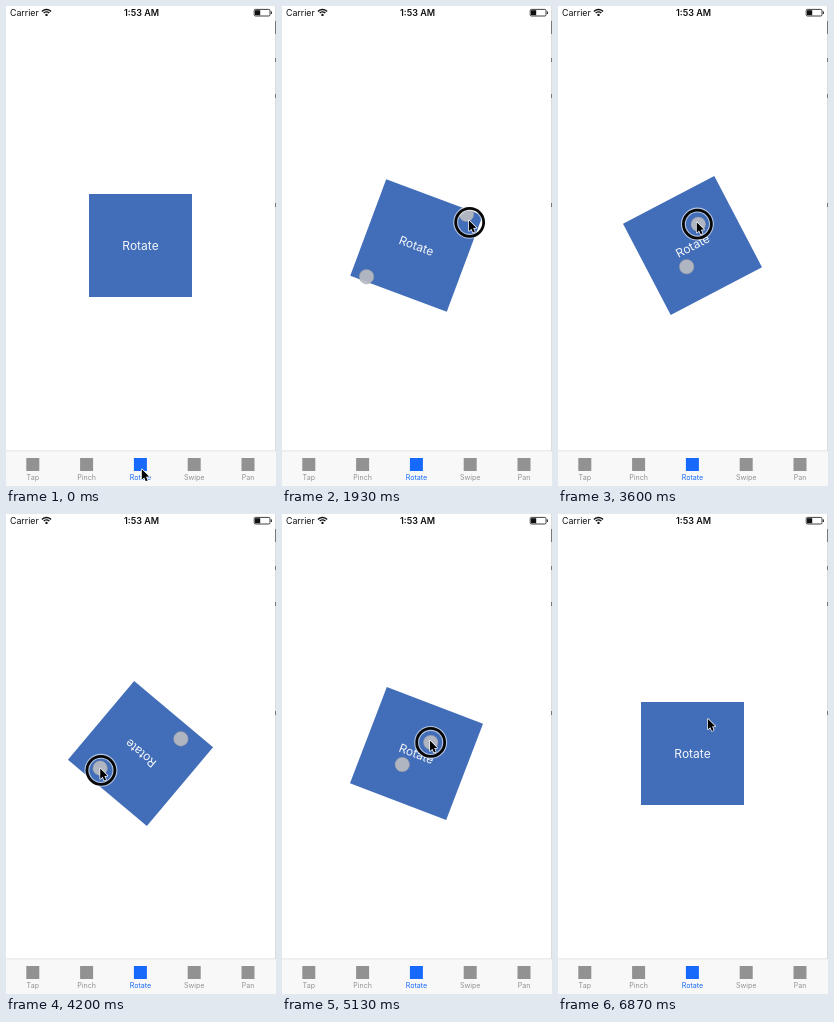
Write an HTML page with a canvas that moves like this. It is 270 px wide and 480 px high and loops after 7.07 s.

```html
<!DOCTYPE html>
<html lang="en">
<head>
<meta charset="utf-8">
<title>Rotate gesture</title>
<style>
  html, body { margin: 0; width: 100%; height: 100%; overflow: hidden; background: #fff; }
  canvas { display: block; width: 270px; height: 480px; }
</style>
</head>
<body>
<canvas id="stage"></canvas>
<script>
const W = 270, H = 480, LOOP = 7070, STEP = 1000 / 15;
const CENTER = { x: 134.5, y: 239.5 }, SIDE = 103;
const PRESS = 1000, RELEASE = 6870, DOTS_ON = 530, TOUCH_LAG = 14;
const FONT = 'Inter, "Liberation Sans", sans-serif';
const BLUE = '#1769fb', GRAY = '#929292';

const canvas = document.getElementById('stage');
const ctx = canvas.getContext('2d');
const scale = window.devicePixelRatio || 1;
canvas.width = W * scale;
canvas.height = H * scale;

// Monotone cubic curve through [time, value] pairs
function curve(keys) {
  const last = keys.length - 1;
  const rise = i => (keys[i + 1][1] - keys[i][1]) / (keys[i + 1][0] - keys[i][0]);
  const slopes = keys.map((_, i) => {
    if (i === 0 || i === last) return 0;
    const a = rise(i - 1), b = rise(i);
    return a * b <= 0 ? 0 : 2 * a * b / (a + b);
  });
  return t => {
    if (t <= keys[0][0]) return keys[0][1];
    if (t >= keys[last][0]) return keys[last][1];
    let i = 0;
    while (t >= keys[i + 1][0]) i++;
    const [t0, v0] = keys[i], [t1, v1] = keys[i + 1];
    const d = t1 - t0, u = (t - t0) / d, w = 1 - u;
    return v0 * (1 + 2 * u) * w * w + slopes[i] * d * u * w * w
         + v1 * u * u * (3 - 2 * u) - slopes[i + 1] * d * u * u * w;
  };
}

const squareAngle = curve([
  [1000, 0], [1200, 22], [1400, 92.5], [1670, 226], [2200, 530], [2470, 641],
  [3000, 718], [3400, 718], [3600, 692.4], [4200, 580], [4800, 422],
  [5130, 381], [5530, 379], [6130, 366], [6670, 360]
]);
const gripOffset = curve([
  [1000, -65], [1200, -48], [1400, -42], [2470, -46], [3400, -46],
  [3600, -49.5], [4200, -63], [5130, -59], [6670, -63.8]
]);
const gripRadius = curve([
  [1000, 62], [1100, 64], [1250, 56], [1400, 64.5], [1500, 70], [1670, 56],
  [1830, 63], [1990, 56], [2140, 71], [2290, 52], [2470, 35.5], [3000, 25],
  [3600, 22], [4200, 43], [4800, 30], [5130, 18], [6670, 36.5]
]);
const approach = curve([[0, 0], [330, 0.5], [670, 1]]);

function pointer(t) {
  const a = (squareAngle(t) + gripOffset(t)) * Math.PI / 180, r = gripRadius(t);
  const grip = { x: CENTER.x + r * Math.cos(a), y: CENTER.y + r * Math.sin(a) };
  if (t >= PRESS) return grip;
  const u = approach(t);
  return { x: 136.5 + (grip.x - 136.5) * u, y: 465 + (grip.y - 465) * u };
}

function rect(x, y, w, h, color) {
  ctx.fillStyle = color;
  ctx.fillRect(x, y, w, h);
}

function text(label, x, y, size, color, weight = 400, align = 'center') {
  ctx.font = `${weight} ${size}px ${FONT}`;
  ctx.textAlign = align;
  ctx.fillStyle = color;
  ctx.fillText(label, x, y);
}

function circle(x, y, r, color, width) {
  ctx.beginPath();
  ctx.arc(x, y, r, 0, Math.PI * 2);
  if (width) {
    ctx.strokeStyle = color;
    ctx.lineWidth = width;
    ctx.stroke();
  } else {
    ctx.fillStyle = color;
    ctx.fill();
  }
}

function drawStatusBar() {
  text('Carrier', 4, 10, 8.8, '#111', 400, 'left');
  text('1:53 AM', 135.5, 10, 9, '#111', 600);

  ctx.strokeStyle = '#111';
  ctx.lineWidth = 1.4;
  for (const r of [3.7, 6.1]) {
    ctx.beginPath();
    ctx.arc(40.5, 9.6, r, -Math.PI * 0.77, -Math.PI * 0.23);
    ctx.stroke();
  }
  circle(40.5, 8.9, 1.2, '#111');

  ctx.lineWidth = 0.8;
  ctx.beginPath();
  ctx.roundRect(248.2, 3.4, 15.8, 6.6, 1.2);
  ctx.stroke();
  rect(249, 4.2, 5.2, 5, '#111');
  rect(264.8, 5.4, 1, 2.6, '#111');
}

function drawTabBar() {
  rect(0, 445, W, 35, '#f8f8f8');
  rect(0, 444.6, W, 0.6, '#d2d2d2');
  ['Tap', 'Pinch', 'Rotate', 'Swipe', 'Pan'].forEach((label, i) => {
    const x = 26.8 + i * 53.8, color = i === 2 ? BLUE : GRAY;
    rect(x - 6.5, 452, 13, 13, color);
    text(label, x, 473.6, 7.1, color);
  });
}

function drawEdge() {
  rect(269, 0, 1, 445, '#dcdcdc');
  for (const y of [15, 52, 88, 197]) rect(269, y, 1, y === 15 ? 13 : 4, '#777');
}

function drawSquare(angle) {
  ctx.save();
  ctx.translate(CENTER.x, CENTER.y);
  ctx.rotate(angle * Math.PI / 180);
  rect(-SIDE / 2, -SIDE / 2, SIDE, SIDE, '#426db8');
  text('Rotate', 0, 4.6, 12, '#f4f7fc');
  ctx.restore();
}

function drawTouches({ x, y }) {
  for (const [px, py] of [[x, y], [2 * CENTER.x - x, 2 * CENTER.y - y]]) {
    circle(px, py, 7.3, 'rgba(187,189,194,0.9)');
    circle(px, py, 7.2, 'rgba(150,153,160,0.6)', 0.8);
  }
}

function drawRing({ x, y }) {
  circle(x, y, 14, 'rgba(255,255,255,0.6)', 5);
  circle(x, y, 14, '#080808', 2.8);
}

function drawArrow({ x, y }) {
  const outline = [[0, 0], [0, 10.4], [2.4, 8.2], [4, 12], [5.8, 11.2], [4.2, 7.5], [7.3, 7.3]];
  ctx.beginPath();
  for (const [dx, dy] of outline) ctx.lineTo(x - 0.7 + dx, y - 1.8 + dy);
  ctx.closePath();
  ctx.lineJoin = 'round';
  ctx.strokeStyle = '#fff';
  ctx.lineWidth = 1.4;
  ctx.stroke();
  ctx.fillStyle = '#000';
  ctx.fill();
}

function draw(t) {
  const hand = pointer(t), touching = t >= DOTS_ON && t < RELEASE - 10;
  ctx.setTransform(scale, 0, 0, scale, 0, 0);
  rect(0, 0, W, H, '#fff');
  drawEdge();
  drawStatusBar();
  drawTabBar();
  drawSquare(squareAngle(t));
  if (touching) drawTouches(pointer(t - TOUCH_LAG));
  if (touching && t >= PRESS - 10) drawRing(hand);
  drawArrow(hand);
}

const start = performance.now();
function tick() {
  const t = (performance.now() - start) % LOOP;
  draw(Math.floor((t + 4) / STEP) * STEP);
  requestAnimationFrame(tick);
}
tick();
</script>
</body>
</html>
```
